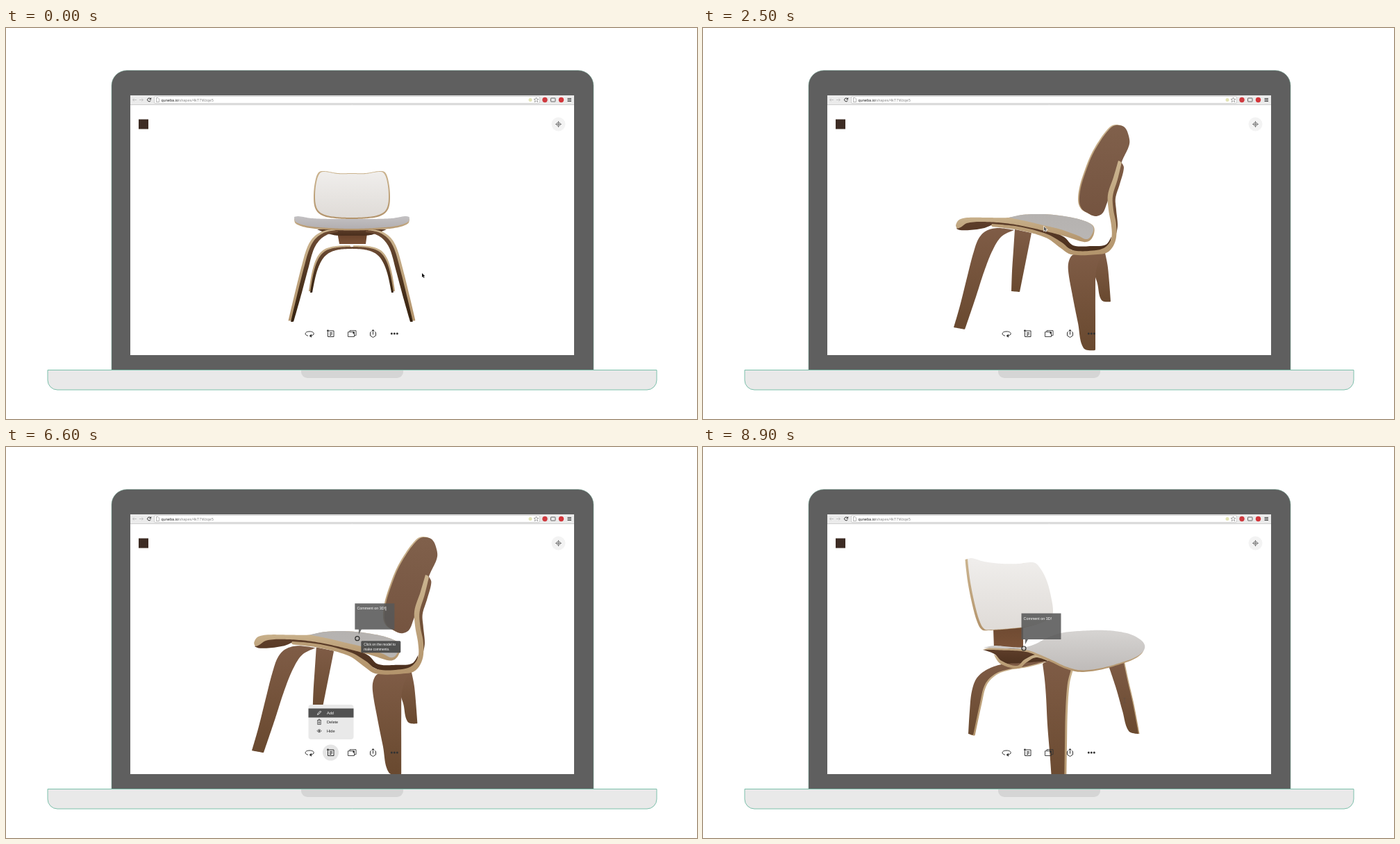
Recreate the animation shown at these times as an HTML page with a canvas. Size 995 by 563 pixels, loop 9000 ms.

```html
<!DOCTYPE html>
<html lang="en">
<head>
<meta charset="utf-8">
<title>Chair viewer</title>
<style>
html, body { margin: 0; width: 100%; height: 100%; overflow: hidden; background: #fff; }
canvas { display: block; }
</style>
</head>
<body>
<canvas id="stage" width="995" height="563"></canvas>
<script>
const ctx = document.getElementById('stage').getContext('2d');
const LOOP = 9000, STEP = 100, SAMPLES = 180;
const FONT = '"Liberation Sans", Arial, sans-serif';
const mix = (a, b, u) => a + (b - a) * u;

// ---------- outlines ----------
// Smooth closed curve through flat [x, y, ...]; sharp turns stay corners.
function outline(flat) {
  const v = [];
  for (let i = 0; i < flat.length; i += 2) v.push([flat[i], flat[i + 1]]);
  const n = v.length, at = i => v[(i + n) % n];
  const dist = (a, b) => Math.hypot(b[0] - a[0], b[1] - a[1]) || 1e-6;
  const unit = (a, b) => [(b[0] - a[0]) / dist(a, b), (b[1] - a[1]) / dist(a, b)];
  const tangents = v.map((p, i) => {
    const a = unit(at(i - 1), p), b = unit(p, at(i + 1));
    return a[0] * b[0] + a[1] * b[1] < 0.35 ? [0, 0] : unit(at(i - 1), at(i + 1));
  });
  const fine = [];
  for (let i = 0; i < n; i++) {
    const p = v[i], q = at(i + 1), a = tangents[i], b = tangents[(i + 1) % n], k = dist(p, q) / 3;
    for (let s = 0; s < 10; s++) {
      const u = s / 10, w = 1 - u;
      fine.push([0, 1].map(c => w * w * w * p[c] + 3 * w * w * u * (p[c] + a[c] * k) +
        3 * w * u * u * (q[c] - b[c] * k) + u * u * u * q[c]));
    }
  }
  fine.push(v[0]);
  const run = [0];
  for (let i = 1; i < fine.length; i++) run.push(run[i - 1] + dist(fine[i - 1], fine[i]));
  const out = [], total = run[run.length - 1];
  for (let i = 0, j = 0; i < SAMPLES; i++) {
    const d = total * i / SAMPLES;
    while (run[j + 1] < d) j++;
    const u = (d - run[j]) / (run[j + 1] - run[j]);
    out.push([mix(fine[j][0], fine[j + 1][0], u), mix(fine[j][1], fine[j + 1][1], u)]);
  }
  return out;
}

const rgb = hex => [1, 3, 5].map(i => parseInt(hex.slice(i, i + 2), 16));
const tone = (top, bottom) => [rgb(top), rgb(bottom)];
const WHITE = tone('#f0eeec', '#dfdbd7'), GREY = tone('#d6d4d2', '#bfbbb9'), DULL = tone('#c3c1c3', '#b2aeb0');
const BROWN = tone('#7f5c46', '#69492f'), BACK = tone('#80604b', '#755440');
const DARK = tone('#5f3f2b', '#4a2f1d'), INNER = tone('#6e4c34', '#35220f'), TAN = tone('#cbb48f', '#b3946c');

class Pose {
  constructor(ringX, ringY) { this.ring = [ringX, ringY]; this.shapes = new Map(); }
  flat(name, color, pts) {
    this.shapes.set(name, { color, pts: outline(pts) });
    return this;
  }
  // A face lying over a shifted tan copy that shows as its plywood edge.
  ply(name, color, dx, dy, pts) {
    return this.flat(name + 'Edge', TAN, pts.map((p, i) => p + (i % 2 ? dy : dx))).flat(name, color, pts);
  }
  zoom(sx, sy, dx, dy) {
    const move = ([x, y]) => [x * sx + dx, y * sy + dy];
    const p = new Pose(...move(this.ring));
    for (const [name, s] of this.shapes) p.shapes.set(name, { color: s.color, pts: s.pts.map(move) });
    return p;
  }
}
// Mirror about the chair's axis, keeping the winding.
function mirror(pts) {
  const out = [];
  for (let i = pts.length - 2; i >= 0; i -= 2) out.push(996 - pts[i], pts[i + 1]);
  return out;
}

// ---------- chair poses ----------
const rearLeg = [438,381, 443,352, 450,332, 460,321, 477,316, 498,315, 498,318, 480,319, 465,324, 455,334, 447,353, 441,381];
const frontLeg = [410,423, 419,385, 429,345, 437,318, 446,303, 460,294, 478,291, 478,294, 464,297, 452,305, 443,319, 435,347, 424,388, 414,423];
const front = new Pose(455, 275)
  .flat('padEdge', TAN, [450,208, 458,206, 478,209, 498,209, 518,209, 538,206, 546,208, 551,222, 553,243, 551,259, 544,268, 530,273, 498,275, 466,273, 452,268, 445,259, 443,243, 445,222])
  .flat('pad', WHITE, [452,209, 459,207, 478,210, 498,210, 518,210, 537,207, 544,209, 549,222, 551,243, 549,258, 543,266, 529,271, 498,273, 467,271, 453,266, 447,258, 445,243, 447,222])
  .ply('legRR', INNER, -2, -2, rearLeg)
  .ply('legRL', INNER, 2, -2, mirror(rearLeg))
  .flat('spine', tone('#5c3a25', '#7b5136'), [476,288, 521,288, 518,311, 480,311])
  .flat('under', DARK, [448,290, 498,288, 548,290, 525,298, 498,299, 471,298])
  .ply('legFR', INNER, -3.5, -1.5, frontLeg)
  .ply('legFL', INNER, 3.5, -1.5, mirror(frontLeg))
  .ply('seat', DULL, 0, 2.5, [415,272, 421,271, 440,274, 470,275, 498,275, 526,275, 556,274, 575,271, 581,272, 579,279, 562,285, 530,288, 498,289, 466,288, 434,285, 417,279]);

const above = new Pose(500, 262)
  .flat('legFR', BROWN, [454,336, 455,320, 457,305, 469,307, 466,322, 463,338])
  .flat('legRR', BROWN, [562,356, 557,340, 552,328, 566,325, 570,338, 571,357])
  .flat('legFL', BROWN, [395,402, 403,370, 410,335, 413,315, 417,302, 425,299, 443,303, 437,312, 428,340, 418,372, 408,403])
  .flat('under', DARK, [518,320, 545,308, 568,306, 571,318, 562,327, 540,327])
  .flat('legRL', BROWN, [530,434, 526,410, 519,375, 517,352, 519,336, 526,328, 566,328, 559,332, 551,345, 548,370, 547,400, 544,437])
  .flat('spine', BROWN, [591,219, 593,225, 584,245, 577,262, 577,285, 579,300, 574,318, 566,322, 567,300, 567,275, 572,255, 584,234])
  .flat('rail', TAN, [590,219, 594,220, 586,240, 574,262, 571,278, 572,300, 572,318, 566,329, 552,331, 530,328, 511,322, 530,324, 552,327, 563,325, 568,316, 567,298, 566,275, 571,256, 581,236])
  .ply('seat', GREY, 0, 3, [388,296, 400,288, 420,273, 440,258, 452,252, 465,250, 485,251, 510,255, 535,262, 551,272, 550,296, 546,307, 538,315, 526,318, 500,312, 470,305, 440,298, 415,293, 398,292])
  .ply('pad', WHITE, 1, 1, [583,204, 588,190, 594,184, 600,183, 603,188, 602,195, 599,202])
  .ply('padBack', BACK, -2.5, -1, [564,209, 576,201, 588,198, 602,197, 596,211, 586,233, 574,257, 560,281, 551,291, 543,294, 536,291, 533,283, 536,268, 543,249, 553,227]);

const side = new Pose(505, 278)
  .flat('legFR', BROWN, [444,379, 445,350, 447,320, 449,290, 473,295, 468,320, 462,350, 456,380])
  .flat('legRR', BROWN, [574,392, 568,368, 564,352, 569,330, 579,324, 583,345, 587,394])
  .flat('legFL', BROWN, [361,431, 370,400, 380,360, 389,325, 397,303, 408,292, 425,288, 448,291, 430,300, 417,320, 405,350, 392,390, 377,434])
  .flat('legRL', BROWN, [548,461, 540,425, 532,385, 526,350, 527,335, 534,326, 580,324, 572,332, 566,350, 565,385, 565,420, 565,464])
  .ply('padBack', BACK, -1.8, -.8, [574,160, 584,147, 591,141, 599,140, 607,143, 612,152, 614,167, 604,190, 592,222, 581,254, 575,267, 565,271, 555,267, 546,261, 542,250, 544,230, 551,207, 561,182])
  .flat('spine', BROWN, [602,193, 606,201, 600,225, 594,245, 595,262, 597,285, 594,300, 590,285, 588,262, 587,244, 594,220])
  .flat('under', DARK, [365,289, 372,282, 400,276, 440,279, 490,288, 520,301, 533,313, 560,314, 580,312, 588,300, 586,318, 540,322, 517,312, 496,299, 455,288, 420,283, 405,288, 385,291, 370,291])
  .flat('rail', TAN, [598,191, 603,193, 597,218, 590,242, 591,262, 595,283, 594,306, 584,322, 568,326, 530,326, 514,316, 494,302, 455,291, 415,286, 415,282, 455,286, 496,297, 517,309, 532,320, 566,320, 580,315, 588,303, 588,285, 584,262, 583,240, 591,215])
  .flat('seatEdge', TAN, [364,284, 369,276, 382,273, 410,273, 440,273, 460,269, 490,268, 520,271, 547,277, 562,285, 563,296, 557,306, 548,308, 525,301, 495,293, 465,286, 435,281, 400,279, 380,281, 371,287, 366,289])
  .flat('seat', tone('#b5b2b0', '#b9b6b4'), [440,273, 460,269, 490,268, 520,271, 547,277, 561,285, 561,295, 553,304, 540,299, 515,290, 490,284, 465,278]);

const turned = new Pose(456, 267)
  .flat('legRR', BROWN, [502,353, 500,335, 498,316, 517,309, 516,330, 512,353])
  .ply('legFR', BROWN, -1.5, .5, [378,396, 383,360, 388,335, 391,314, 412,326, 406,345, 398,370, 392,397])
  .ply('legFL', BROWN, -2, 0, [454,495, 453,440, 453,390, 453,360, 449,336, 455,326, 478,317, 487,320, 488,345, 485,380, 480,420, 473,495])
  .flat('spine', tone('#805439', '#68432c'), [541,256, 585,263, 584,280, 582,298, 560,296, 546,292, 545,280])
  .ply('pad', WHITE, 3, 2, [535,157, 543,156, 560,159, 580,160, 600,159, 617,156, 627,155, 628,163, 622,190, 612,225, 602,252, 595,262, 586,264, 565,262, 540,258, 518,250, 508,241, 506,228, 508,205, 516,183, 527,164])
  .flat('under', DARK, [515,311, 545,304, 582,299, 575,306, 560,314, 548,318, 535,314])
  .ply('legRL', BROWN, -2, 1, [603,418, 596,393, 588,365, 578,346, 561,331, 541,320, 524,310, 545,314, 565,313, 585,317, 598,327, 604,343, 608,370, 613,413])
  .flat('rail', TAN, [579,302, 581,303, 565,315, 549,320, 535,316, 522,309, 526,308, 537,313, 548,317, 562,311])
  .ply('seat', GREY, 1.5, 3.5, [364,285, 369,274, 385,265, 410,260, 440,258, 470,257, 495,260, 512,270, 530,282, 548,291, 575,294, 592,295, 575,298, 550,301, 520,306, 495,313, 470,323, 450,332, 435,336, 420,334, 400,325, 380,311, 368,300]);

const facing = new Pose(462, 290)
  .flat('spine', tone('#6d4931', '#7d5439'), [418,261, 461,256, 461,292, 440,294, 419,290])
  .ply('pad', WHITE, -3.5, 1, [381,161, 387,160, 405,165, 430,168, 455,168, 475,166, 483,171, 494,190, 501,215, 504,238, 500,246, 490,252, 470,258, 445,261, 415,263, 405,262, 398,250, 391,225, 385,195, 382,172])
  .ply('legFL', BROWN, 1.5, 0, [613,409, 604,380, 595,348, 584,315, 605,306, 611,335, 619,370, 627,413])
  .flat('under', DARK, [403,292, 462,290, 485,298, 503,308, 470,312, 455,317, 430,312, 421,299])
  .ply('legRR', BROWN, 2.5, 1, [382,413, 384,380, 387,352, 394,333, 408,321, 430,313, 460,311, 495,308, 465,316, 440,320, 420,327, 406,342, 399,368, 389,415])
  .flat('rail', TAN, [419,299, 422,300, 430,308, 452,315, 463,306, 480,299, 500,305, 498,309, 480,303, 466,310, 454,319, 428,312])
  .ply('legFR', BROWN, 3, 0, [503,495, 500,450, 496,400, 494,360, 492,335, 489,312, 508,306, 530,321, 525,340, 522,380, 521,430, 520,495])
  .ply('seat', GREY, -1.5, 2.5, [404,289, 420,286, 445,288, 465,288, 480,283, 495,275, 515,268, 540,265, 580,264, 610,268, 628,276, 636,285, 634,294, 622,303, 600,311, 575,318, 555,321, 540,321, 522,316, 505,308, 485,299, 465,292, 430,290]);

const close = side.zoom(1.055, 1.055, -26.9, -17.6);
const keys = [
  [0, front], [700, turned.zoom(.78, .78, 110, 60)], [1500, above],
  [2000, side.zoom(.88, .88, 68, 50)], [2500, side], [2800, close],
  [6800, close], [7600, turned], [8250, front.zoom(1.28, 1.44, -139, -140)], [8900, facing]
];

// ---------- drawing helpers ----------
function span(list, t) {
  let i = 0;
  while (i < list.length - 2 && t >= list[i + 1][0]) i++;
  const a = list[i], b = list[i + 1];
  return [a, b, Math.max(0, Math.min(1, (t - a[0]) / (b[0] - a[0])))];
}
function box(x, y, w, h, r, fill, line) {
  ctx.beginPath();
  ctx.roundRect(x, y, w, h, r);
  if (fill) { ctx.fillStyle = fill; ctx.fill(); }
  if (line) { ctx.strokeStyle = line; ctx.stroke(); }
}
function disc(x, y, r, fill) {
  ctx.beginPath();
  ctx.arc(x, y, r, 0, 7);
  ctx.fillStyle = fill;
  ctx.fill();
}
function line(d, color, width = 1) {
  ctx.strokeStyle = color;
  ctx.lineWidth = width;
  ctx.stroke(new Path2D(d));
  ctx.lineWidth = 1;
}
function fillPath(d, color) {
  ctx.fillStyle = color;
  ctx.fill(new Path2D(d));
}
function text(s, x, y, size, color) {
  ctx.font = size + 'px ' + FONT;
  ctx.fillStyle = color;
  ctx.fillText(s, x, y);
}

function drawShape(pts, color, alpha) {
  const ys = pts.map(p => p[1]);
  const g = ctx.createLinearGradient(0, Math.min(...ys), 0, Math.max(...ys));
  color.forEach((c, i) => g.addColorStop(i, `rgb(${c.map(Math.round)})`));
  ctx.globalAlpha = alpha;
  ctx.fillStyle = g;
  ctx.beginPath();
  pts.forEach(p => ctx.lineTo(p[0], p[1]));
  ctx.fill();
  ctx.globalAlpha = 1;
}

// Morph two poses; parts found in only one of them fade.
function drawChair(a, b, u) {
  const [near, far] = u < .5 ? [a, b] : [b, a];
  const rest = [...far.shapes.keys()].filter(k => !near.shapes.has(k));
  for (const name of [...rest, ...near.shapes.keys()]) {
    const p = a.shapes.get(name), q = b.shapes.get(name);
    if (p && q) {
      drawShape(p.pts.map((v, i) => [mix(v[0], q.pts[i][0], u), mix(v[1], q.pts[i][1], u)]),
        p.color.map((c, i) => c.map((n, j) => mix(n, q.color[i][j], u))), 1);
    } else {
      const alpha = p ? 1 - u : u;
      if (alpha > 0) drawShape((p || q).pts, (p || q).color, alpha);
    }
  }
}

function drawLaptop() {
  ctx.fillStyle = '#fff';
  ctx.fillRect(0, 0, 995, 563);
  box(152, 61, 694, 432, [22, 22, 0, 0], '#5f5f5f', 'rgba(110,170,150,.45)');
  box(60, 492.5, 877, 28.5, [0, 0, 14, 14], '#e9e9e9', '#7cc0ab');
  box(425, 493, 147, 11, [0, 0, 9, 9], '#d5d5d5');
  box(179, 97, 639, 374, 0, '#fff');
}

function drawBrowser() {
  box(179, 97, 639, 13.5, 0, '#ebebeb');
  line('M179 110.5H818', '#c4c4c4', .8);
  line('M188 103.5h-5.5m2-2l-2 2l2 2M192 103.5h5.5m-2-2l2 2l-2 2', '#c2c2c2');
  line('M208 102a2.4 2.4 0 1 0 .3 2.3M208.700 100.500v2.200h-2.200', '#333');
  box(213.500, 98.500, 555, 10, 1.500, '#fff', '#cfcfcf');
  line('M216.500 100.500h2.500l1.500 1.500v4.500h-4z', '#999', .7);
  text('quneba.io', 223.5, 105.6, 5.6, '#222');
  text('/shapes/4kT7Wzqe5', 247.8, 105.6, 5.6, '#8a8a8a');
  disc(755, 103.5, 2.5, '#e3e4b4');
  line('M763.500 100l1 2.400h2.500l-2 1.700l.8 2.600l-2.300-1.500l-2.300 1.500l.8-2.600l-2-1.700h2.500z', '#888', .7);
  disc(776, 103.5, 3.7, '#cf3b40');
  box(784.5, 101, 6.5, 5, .5, null, '#666');
  disc(799.5, 103.5, 3.7, '#d3353a');
  line('M808.500 101.500h5.500M808.500 103.500h5.500M808.500 105.500h5.500', '#333', 1.2);
}

function drawTools() {
  box(191, 131.5, 14, 14, 0, '#3d2c24');
  disc(795.5, 138.5, 10, '#f3f3f3');
  line('M795.500 134v9M791 138.500h9M792.800 138.500a2.700 2.700 0 1 0 5.400 0a2.700 2.700 0 1 0-5.400 0', '#666', .8);
  const ink = '#333';
  line('M435 443.200c-6-1-5-6.200 2-6.200c8 0 8 5.500 1.500 6.200', ink);
  fillPath('M440 440.800v5l-3.500-2.500z', ink);
  line('M465 436h7v8.500h-8.500v-7M466 438.700h4M466 440.700h4M466 442.500h2.500', ink);
  disc(463.5, 436, 1.4, ink);
  line('M495 437.700v-2h9v7h-2.500M492.500 437.700h9v6.800h-9z', ink, .9);
  disc(500.5, 439, 1.2, ink);
  line('M526 437.500l-1.500 1v4.500l4 2.500l4-2.500v-4.500l-1.500-1M528.500 441.500v-7M526.500 436.500l2-2l2 2', ink);
  for (const x of [555.3, 559.3, 563.3]) disc(x, 440, 1.5, ink);
}

function drawMenu(t) {
  if (t >= 3100) {
    box(435.5, 371, 65, 50, 4, '#e9e9e9');
    const picked = t >= 3400;
    if (picked) box(435.5, 376.5, 65, 13, 0, '#515151');
    const ink = picked ? '#fff' : '#222';
    text('Add', 462, 385, 5.6, ink);
    text('Delete', 462, 398, 5.6, '#222');
    text('Hide', 462, 411, 5.6, '#222');
    line('M448.500 385.500l.7-2l3.300-3.500l1.200 1.200l-3.300 3.500z', ink, .8);
    line('M448 393.500h6M450 393.300v-1.200h2v1.200M448.700 394v5.500h4.600v-5.500M450.200 395v3.500M451.800 395v3.500', '#333', .7);
    line('M448 408.800q3-4 6 0q-3 4-6 0z', '#333', .8);
    disc(451, 408.8, 1.1, '#333');
  }
}

// ---------- comment ----------
const MESSAGE = 'Comment on 3D!';
const strokes = [4700, 4900, 5100, 5200, 5300, 5400, 5500, 5600, 5700, 5800, 5900, 6100, 6300, 6600];

function drawComment(t, x, y) {
  ctx.lineWidth = 1.2;
  ctx.strokeStyle = '#2b2b2b';
  ctx.beginPath();
  ctx.arc(x, y, 3, 0, 7);
  ctx.stroke();
  ctx.lineWidth = 1;
  const l = x - 3.5, top = y - 50.5;
  fillPath(`M${l} ${top}h57v37.500h-47.500l-4 7v-7h-5.500z`, 'rgba(88,88,88,.88)');
  const typed = MESSAGE.slice(0, strokes.filter(s => s <= t).length);
  text(typed, x - .5, y - 41.3, 5.4, '#fff');
  if (t < 6800) {
    const end = x + ctx.measureText(typed).width + .3;
    line(`M${end} ${y - 46}v6`, '#fff', .7);
  }
}

function drawTip(x, y) {
  box(x, y, 57, 17, 1.5, 'rgba(75,75,75,.94)');
  text('Click on the model to', x + 4, y + 7, 4.9, '#fff');
  text('make comments.', x + 4, y + 13.5, 4.9, '#fff');
}

// ---------- pointer ----------
const track = [
  [0, 599, 353], [1500, 472, 346], [2000, 480, 322], [2500, 491, 286], [2900, 466, 438],
  [3300, 464, 383], [3500, 464, 383], [3800, 503, 273], [4000, 503, 273], [4100, 506, 276],
  [6700, 506, 276], [6900, 468, 330], [7600, 552, 372], [8900, 607, 365]
];

function drawPointer(t, x, y) {
  if (t >= 4100 && t < 6700) return;
  if ((t >= 200 && t < 2300) || t >= 6900) {
    const color = t > 8600 ? 'rgba(90,80,75,.6)' : '#555';
    line(`M${x - 1.5} ${y - 3.2}h3M${x - 1.5} ${y + 3.2}h3M${x} ${y - 3.2}v6.400`, color, .8);
    return;
  }
  const arrow = `M${x} ${y}v6l1.400-1.300l1.100 2.300l1-.5l-1-2.200h1.800z`;
  line(arrow, '#fff', 1.2);
  fillPath(arrow, t >= 2300 && t < 2700 ? '#555' : '#111');
}

function draw(t) {
  drawLaptop();
  ctx.save();
  ctx.beginPath();
  ctx.rect(179, 97, 639, 374);
  ctx.clip();
  const [a, b, u] = span(keys, t);
  drawChair(a[1], b[1], u);
  drawBrowser();
  if (t >= 2900 && t < 6800) {
    disc(467.5, 440, 11.5, '#e5e5e5');
    drawMenu(t);
  }
  drawTools();
  const [p, q, k] = span(track, t);
  const x = mix(p[1], q[1], k), y = mix(p[2], q[2], k);
  if (t >= 4100) drawComment(t, mix(a[1].ring[0], b[1].ring[0], u), mix(a[1].ring[1], b[1].ring[1], u));
  if (t >= 3600 && t < 6800) drawTip(Math.min(x, 506) + 5.3, t < 4100 ? y + 6.2 : 279.3);
  drawPointer(t, x, y);
  ctx.restore();
}

function frame() {
  const t = performance.now() % LOOP;
  draw(Math.floor(t / STEP) * STEP);
  requestAnimationFrame(frame);
}
frame();
</script>
</body>
</html>
```
